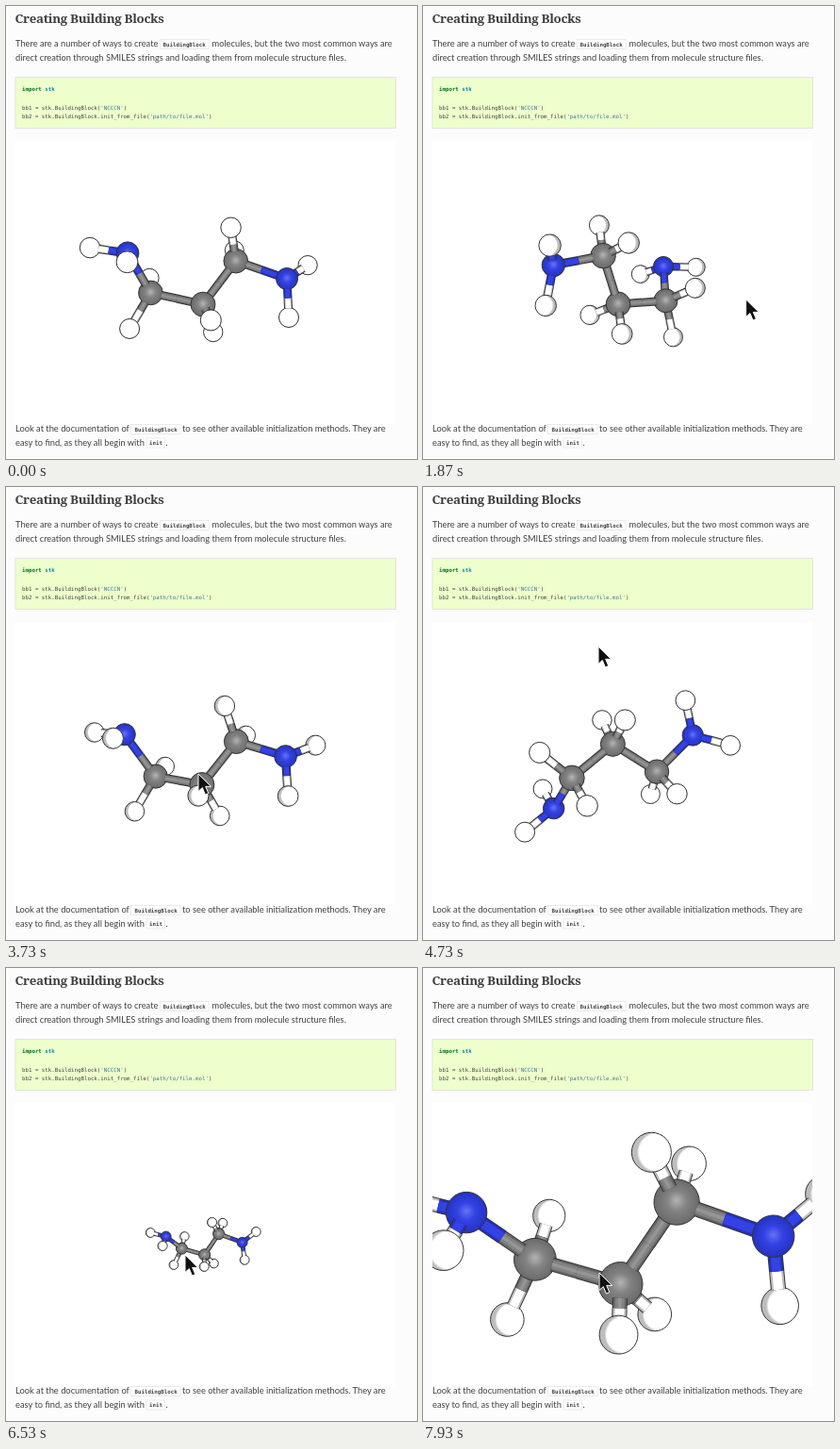
An HTML page with a canvas that plays this animation: 436 by 480 pixels, repeating every 8000 ms.

```html
<!DOCTYPE html>
<html lang="en">
<head>
<meta charset="utf-8">
<title>Creating Building Blocks</title>
<style>
html, body { margin: 0; width: 100%; height: 100%; overflow: hidden; background: #fcfcfc; }
svg, canvas { position: absolute; left: 0; top: 0; }
canvas { left: 10px; top: 143px; background: #fff; }
text { font: 9.3px Lato, sans-serif; fill: #404040; white-space: pre; }
.head { font: bold 13.4px "Noto Serif", serif; letter-spacing: -.35px; }
.code { font: 5.78px "DejaVu Sans Mono", monospace; }
.bold { font-weight: bold; }
.tag { fill: #fff; stroke: #e1e4e5; stroke-width: .7; }
.key { fill: #007020; font-weight: bold; }
.mod { fill: #0e84b5; font-weight: bold; }
.str { fill: #4070a0; }
</style>
</head>
<body>
<svg width="436" height="480">
  <text class="head" x="9.5" y="17.5">Creating Building Blocks</text>
  <text x="10" y="43">There are a number of ways to create</text>
  <rect class="tag" x="163.5" y="35.5" width="51.5" height="10"/>
  <text class="code bold" x="166.6" y="42.5">BuildingBlock</text>
  <text x="218.5" y="43">molecules, but the two most common ways are</text>
  <text x="10" y="57.5">direct creation through SMILES strings and loading them from molecule structure files.</text>
  <rect x="10" y="75.5" width="403.5" height="54" fill="#eeffcc" stroke="#e1e4e5"/>
  <text class="code" x="17" y="90"><tspan class="key">import</tspan> <tspan class="mod">stk</tspan></text>
  <text class="code" x="17" y="109.5">bb1 = stk.BuildingBlock(<tspan class="str">'NCCCN'</tspan>)</text>
  <text class="code" x="17" y="119">bb2 = stk.BuildingBlock.init_from_file(<tspan class="str">'path/to/file.mol'</tspan>)</text>
  <text x="10" y="451">Look at the documentation of</text>
  <rect class="tag" x="132.5" y="443.5" width="52.5" height="10"/>
  <text class="code bold" x="136.5" y="450.5">BuildingBlock</text>
  <text x="187" y="451">to see other available initialization methods. They are</text>
  <text x="10" y="465.5">easy to find, as they all begin with</text>
  <rect class="tag" x="149" y="458" width="19.5" height="10"/>
  <text class="code bold" x="152" y="465">init</text>
  <text x="169.5" y="465.5">.</text>
</svg>
<canvas width="403" height="300"></canvas>
<svg width="436" height="480">
  <path id="cursor" d="M0 0V18.5L4.3 14.6L7.4 22L10.8 20.6L7.7 13.4H13.6Z" fill="#111" stroke="#fff"/>
</svg>
<script>
const LOOP = 8000, STEP = 200 / 3, FOCAL = 870;
const ctx = document.querySelector('canvas').getContext('2d');
const cursor = document.getElementById('cursor');

// radius, light, body and rim colours
const ELEMENTS = {
  C: [12.9, '#b4b4b4', '#838383', '#686868'],
  N: [11.5, '#6673f2', '#3342e4', '#2431bd'],
  H: [10.5, '#ffffff', '#ffffff', '#bdbdbd']
};
const BOND = 4;

// element, x, y, z, index of the bonded atom
const ATOMS = [
  ['N', -79, -30, 32], ['C', -58, 11, -6, 0], ['C', -2, 23, 4, 1],
  ['C', 33, -23, -6, 2], ['N', 87, -4, 0, 3],
  ['H', -119, -36, 21, 0], ['H', -76, -20, 69, 0],
  ['H', -80, 49, -1, 1], ['H', -62, -5, -47, 1],
  ['H', 6, 38, 42, 2], ['H', 9, 54, -25, 2],
  ['H', 27, -57, 18, 3], ['H', 33, -36, -47, 3],
  ['H', 113, -19, -31, 4], ['H', 89, 37, 0, 4]
];

// [time, value] keys
const YAW = [[400, 0], [1870, -3.78], [2000, -3.92], [2800, -1.37], [3280, .3]];
const PITCH = [[400, 0], [1870, .07], [2800, -.1], [3300, .13], [3740, .13],
  [4300, 3.4], [4730, 2.73], [5130, 4], [5930, -.3]];
const ROLL = [[400, 0], [1870, .14], [2800, 0], [3740, 0], [4730, -.3], [5930, -.1]];
const ZOOM = [[6000, 0], [6333, -.33], [6400, -.33], [6533, -.755], [6667, -.755], [7933, .604]];
const SHADE = [[400, 0], [1870, -.3], [2800, 0], [3730, .3], [4730, 0], [5930, .3]];
const POINT_X = [[67, 25], [400, 52], [1870, 343], [2000, 354], [2800, 156], [3220, 59],
  [3600, 204], [3740, 204], [4730, 186], [5930, 190], [6700, 190], [7600, 187]];
const POINT_Y = [[67, 52], [400, 292], [1870, 311], [2800, 299], [3600, 304], [3740, 304],
  [4300, 136], [4730, 169], [5130, 104], [5930, 304], [6700, 304], [7600, 323]];

// Monotone cubic through the keys
function track(keys, t) {
  const last = keys.length - 1;
  if (t <= keys[0][0]) return keys[0][1];
  if (t >= keys[last][0]) return keys[last][1];
  const i = keys.findIndex(k => k[0] > t) - 1;
  const slope = j => j < 0 || j >= last ? 0
    : (keys[j + 1][1] - keys[j][1]) / (keys[j + 1][0] - keys[j][0]);
  const tangent = j => {
    const a = slope(j - 1), b = slope(j);
    return a * b > 0 ? 2 * a * b / (a + b) : 0;
  };
  const [t0, v0] = keys[i], [t1, v1] = keys[i + 1];
  const h = t1 - t0, u = (t - t0) / h, s = u * u * (3 - 2 * u);
  return v0 + (v1 - v0) * s
    + h * u * (1 - u) * ((1 - u) * tangent(i) - u * tangent(i + 1));
}

function linear(keys, t) {
  const i = keys.findIndex(k => k[0] > t);
  if (i < 0) return keys[keys.length - 1][1];
  if (!i) return keys[0][1];
  const [t0, v0] = keys[i - 1], [t1, v1] = keys[i];
  return v0 + (v1 - v0) * (t - t0) / (t1 - t0);
}

const turn = (p, q, a) =>
  [p * Math.cos(a) - q * Math.sin(a), p * Math.sin(a) + q * Math.cos(a)];

function project([x, y, z], zoom) {
  const k = FOCAL / (FOCAL / zoom - z);
  return [201 + x * k, 150 + y * k, k];
}

function drawBall(el, pos, zoom, shade) {
  const [radius, light, body, rim] = ELEMENTS[el];
  const [x, y, k] = project(pos, zoom), r = radius * k;
  const dx = el === 'H' ? shade * r : 0;
  const g = ctx.createRadialGradient(x + dx, y - r * .08, 0, x + dx, y, r * 1.04);
  g.addColorStop(0, light);
  g.addColorStop(el === 'H' ? .88 : .42, body);
  g.addColorStop(1, rim);
  ctx.beginPath();
  ctx.arc(x, y, r, 0, 7);
  ctx.fillStyle = g;
  ctx.fill();
  ctx.lineWidth = 1;
  ctx.strokeStyle = '#333';
  ctx.stroke();
}

function drawStick(el, from, to, zoom) {
  const [, light, body, rim] = ELEMENTS[el];
  const [x0, y0, k0] = project(from, zoom), [x1, y1, k1] = project(to, zoom);
  const w = BOND * (k0 + k1);
  const line = (width, color) => {
    ctx.lineWidth = width;
    ctx.strokeStyle = color;
    ctx.beginPath();
    ctx.moveTo(x0, y0);
    ctx.lineTo(x1, y1);
    ctx.stroke();
  };
  line(w + 1, '#333');
  line(w - 1, rim);
  line(w * .65, body);
  if (el === 'C') line(w * .25, '#959595');
}

function draw(t) {
  const yaw = track(YAW, t), pitch = track(PITCH, t), roll = track(ROLL, t);
  const zoom = Math.exp(linear(ZOOM, t)), shade = track(SHADE, t);
  const places = ATOMS.map(([, x, y, z]) => {
    [x, z] = turn(x, z, yaw);
    [y, z] = turn(y, z, pitch);
    [x, y] = turn(x, y, roll);
    return [x, y, z];
  });

  const parts = [];
  const addHalf = (i, j) => {
    const a = places[i], b = places[j], el = ATOMS[i][0];
    const start = .93 * ELEMENTS[el][0] / Math.hypot(...a.map((v, n) => b[n] - v));
    const at = f => a.map((v, n) => v + (b[n] - v) * f);
    parts.push([at(.3)[2], () => drawStick(el, at(start), at(.5), zoom)]);
  };
  ATOMS.forEach(([el, , , , mate], i) => {
    parts.push([places[i][2], () => drawBall(el, places[i], zoom, shade)]);
    if (mate !== undefined) {
      addHalf(i, mate);
      addHalf(mate, i);
    }
  });
  ctx.clearRect(0, 0, 403, 300);
  parts.sort((a, b) => a[0] - b[0]).forEach(p => p[1]());

  cursor.setAttribute('visibility', t < 60 ? 'hidden' : 'visible');
  cursor.setAttribute('transform', `translate(${track(POINT_X, t)} ${track(POINT_Y, t)})`);
}

const begin = performance.now();
function frame() {
  const t = Math.max(0, performance.now() - begin) % LOOP;
  draw(Math.floor((t + 4) / STEP) % 120 * STEP);
  requestAnimationFrame(frame);
}
frame();
</script>
</body>
</html>
```
